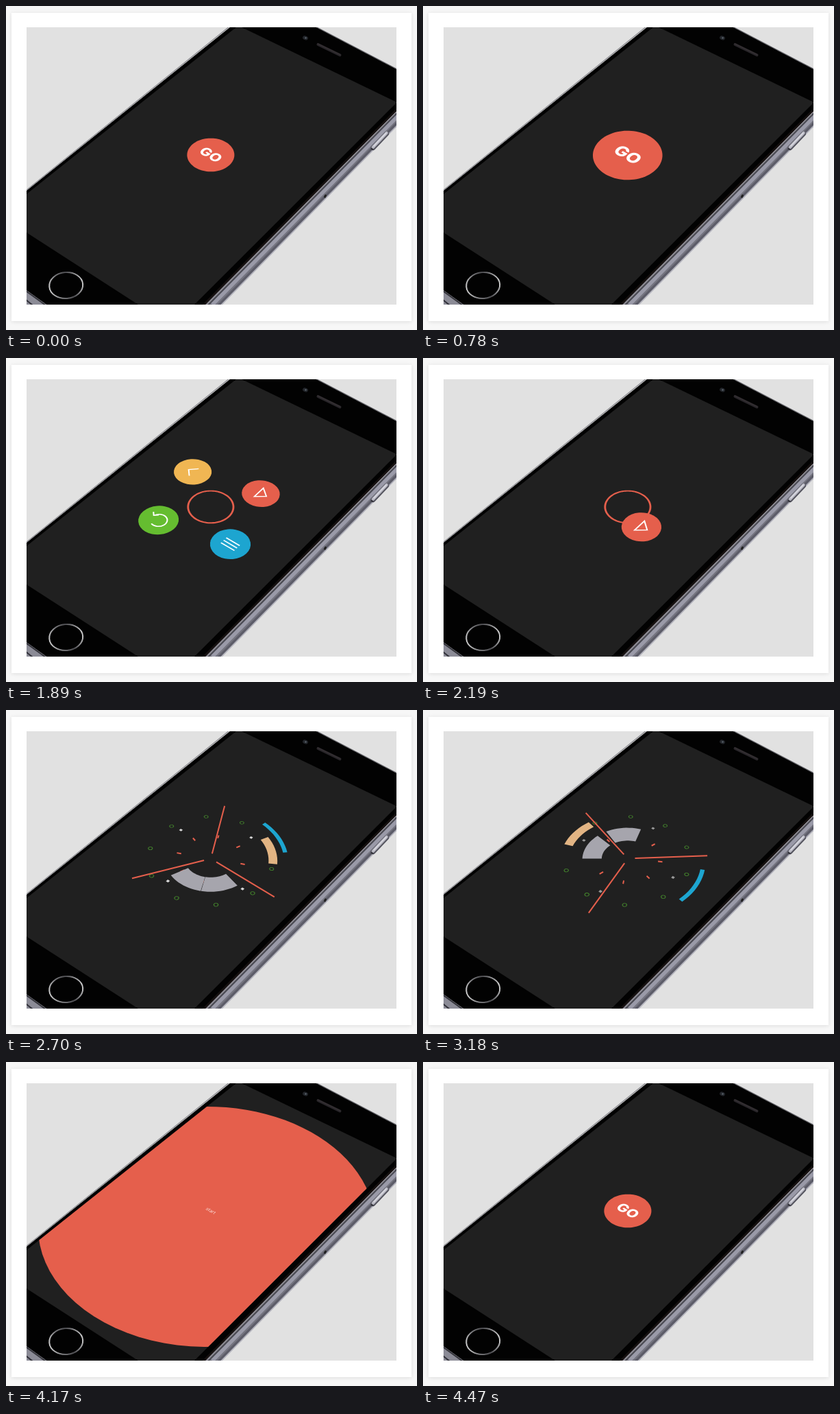
An HTML page with a canvas for the animation above (4.5 s loop, 600 px wide and 472 px high).

```html
<!DOCTYPE html>
<html lang="en">
<head>
<meta charset="utf-8">
<title>Phone menu</title>
<style>
html, body { margin: 0; width: 100%; height: 100%; overflow: hidden; background: #f7f7f7; }
canvas { display: block; width: 600px; height: 472px; }
</style>
</head>
<body>
<canvas id="stage"></canvas>
<script>
const LOOP = 4500, STEP = 30, RAD = Math.PI / 180;
const RED = '#e55f4c', YELLOW = '#f0b653', GREEN = '#65bd30', BLUE = '#1da5d0';
const GRAY = '#a6a5ad', TAN = '#e2b483';
const TILT = 38.7 * RAD, BTN = 34.5, ORBIT = 79.5, ITEM = 28.6;

const canvas = document.getElementById('stage');
const ctx = canvas.getContext('2d');
const dpr = window.devicePixelRatio || 1;
canvas.width = 600 * dpr;
canvas.height = 472 * dpr;

const clamp = p => Math.max(0, Math.min(1, p));
const span = (t, a, b) => clamp((t - a) / (b - a));
const mix = (a, b, p) => a + (b - a) * p;
const easeOut = p => 1 - (1 - p) ** 3;
const easeInOut = p => p < .5 ? 4 * p ** 3 : 1 - 4 * (1 - p) ** 3;
const backOut = p => 1 + 2.2 * (p - 1) ** 3 + 1.2 * (p - 1) ** 2;

// Phone plane to stage, with perspective
function project(x, y) {
  const w = 1 - .00055 * y + .0001 * x;
  return [299 + x / w, 216.5 + .705 * y / w];
}
const polar = (r, deg) => project(r * Math.cos(deg * RAD), r * Math.sin(deg * RAD));

function home() { ctx.setTransform(dpr, 0, 0, dpr, 0, 0); }

// Draw in the phone's own axes around a point of the plane
function place(x, y, scale, draw) {
  if (scale <= .001) return;
  const p = project(x, y), a = project(x + 1, y), b = project(x, y + 1);
  ctx.save();
  ctx.transform(a[0] - p[0], a[1] - p[1], b[0] - p[0], b[1] - p[1], p[0], p[1]);
  ctx.rotate(TILT);
  ctx.scale(scale, scale);
  draw();
  ctx.restore();
}

function trace(points, close) {
  points.forEach((p, i) => i ? ctx.lineTo(p[0], p[1]) : ctx.moveTo(p[0], p[1]));
  if (close) ctx.closePath();
}
function poly(points, fill) {
  ctx.beginPath();
  trace(points, true);
  ctx.fillStyle = fill;
  ctx.fill();
}
function line(points, color, width) {
  ctx.beginPath();
  trace(points);
  ctx.strokeStyle = color;
  ctx.lineWidth = width;
  ctx.stroke();
}
function arcPoints(r, from, to) {
  const n = Math.max(8, Math.ceil(Math.abs(to - from) / 4));
  return Array.from({ length: n + 1 }, (_, i) => polar(r, mix(from, to, i / n)));
}
function band(r0, r1, mid, width, color) {
  const a = mid - width / 2, b = mid + width / 2;
  poly([...arcPoints(r1, a, b), ...arcPoints(r0, b, a)], color);
}
function disc(r, hole = 0) {
  ctx.beginPath();
  trace(arcPoints(r, 0, 360), true);
  if (hole > 0) trace(arcPoints(hole, 360, 0), true);
  ctx.fillStyle = RED;
  ctx.fill();
}
function label(text, size, weight) {
  ctx.font = `${weight} ${size}px Inter, "Open Sans", sans-serif`;
  ctx.textAlign = 'center';
  ctx.textBaseline = 'alphabetic';
  ctx.fillStyle = '#fff';
  ctx.fillText(text, 0, size * .36);
}

function backdrop() {
  ctx.fillStyle = '#f7f7f7';
  ctx.fillRect(0, 0, 600, 472);
  ctx.save();
  ctx.shadowColor = 'rgba(0,0,0,.11)';
  ctx.shadowBlur = 6 * dpr;
  ctx.shadowOffsetY = dpr;
  ctx.fillStyle = '#fff';
  ctx.fillRect(8, 10, 584, 449);
  ctx.restore();
  ctx.fillStyle = '#e1e1e1';
  ctx.fillRect(30, 31, 540, 404);
}

function screenPath() {
  ctx.beginPath();
  trace([[336, 31], [344, 31], [570, 140], [570, 141], [275, 435], [193, 435], [30, 330], [30, 274]], true);
}

function phone() {
  // metal side
  poly([[570, 146], [570, 175], [314, 435], [284, 435]], '#74747f');
  line([[574, 158], [301, 435]], '#9a9aa8', 6);
  line([[574, 153], [294, 437]], '#4a4a52', 2);
  line([[574, 167], [309, 437]], '#5c5c68', 3);
  line([[574, 171], [313, 437]], '#b3b3bd', 1.5);

  // glass
  poly([[327, 31], [453, 31], [570, 92], [570, 150], [289, 435], [59, 435], [30, 415], [30, 269]], '#020202');
  line([[574, 147], [287, 437]], '#15100f', 3);
  line([[574, 150], [290, 438]], '#a9a5a8', 1);
  line([[326, 30], [29, 269]], '#8e8e93', 1.4);
  line([[329, 31], [30, 271]], '#000', 2);
  line([[452, 30], [571, 92]], '#55555c', 1);
  poly([[30, 414], [59, 435], [30, 435]], '#8b8b96');
  line([[29, 415], [58, 436]], '#34343a', 2);
  line([[29, 428], [39, 436]], '#32323a', 2);

  screenPath();
  ctx.fillStyle = '#202020';
  ctx.fill();

  // earpiece and camera
  ctx.lineCap = 'round';
  line([[455.5, 56], [487.5, 71.5]], '#29262a', 4);
  line([[455, 55], [488, 71]], '#3a3436', 1);
  ctx.beginPath();
  ctx.ellipse(437, 46.5, 4, 3, .3, 0, 7);
  ctx.fillStyle = '#22252a';
  ctx.fill();
  ctx.beginPath();
  ctx.arc(437.5, 46.5, 1.3, 0, 7);
  ctx.fillStyle = '#59616a';
  ctx.fill();

  // side button and notch
  line([[536, 206.5], [555.5, 186]], '#55555f', 7);
  line([[536, 205.5], [555.5, 185]], '#b8b8c2', 4.5);
  line([[537, 204], [555, 185]], '#dedee5', 1.4);
  line([[533.5, 208], [535.5, 209]], '#33333a', 2);
  line([[465.5, 278], [466.5, 276]], '#222', 3);
  ctx.lineCap = 'butt';

  const ring = ctx.createLinearGradient(63, 415, 113, 398);
  [[0, '#d2d2d2'], [.3, '#77777a'], [.6, '#4c4c50'], [.85, '#9a9a9c'], [1, '#e0e0e0']]
    .forEach(s => ring.addColorStop(...s));
  ctx.beginPath();
  ctx.ellipse(87.7, 407, 24.5, 19, -.08, 0, 7);
  ctx.strokeStyle = ring;
  ctx.lineWidth = 2;
  ctx.stroke();
}

const icons = {
  play() { trace([[-4, -12], [-4, 11], [10, -.5]], true); },
  menu() { [-6, 0, 6].forEach(v => trace([[-12, v], [12, v]])); },
  undo() {
    ctx.arc(.5, 0, 12, -165 * RAD, 109 * RAD);
    trace([[-16.5, -8], [-11.5, -3], [-6.5, -8]]);
  },
  back() { trace([[2.5, -11], [-8, 0], [1.5, 10]]); }
};
const items = [
  { color: BLUE, icon: 'menu', at: 0 },
  { color: GREEN, icon: 'undo', at: 90 },
  { color: YELLOW, icon: 'back', at: 180 },
  { color: RED, icon: 'play', at: -90 }
];

function drawItem(item, r, deg, scale) {
  const a = deg * RAD + TILT;
  place(r * Math.cos(a), r * Math.sin(a), scale, () => {
    ctx.beginPath();
    ctx.arc(0, 0, ITEM, 0, 7);
    ctx.fillStyle = item.color;
    ctx.fill();
    ctx.beginPath();
    icons[item.icon]();
    ctx.strokeStyle = '#fff';
    ctx.lineWidth = 2;
    ctx.stroke();
  });
}

function button(t) {
  if (t >= 2400) return;
  const grow = mix(1, 1.51, easeOut(span(t, 0, 270)) * (1 - easeInOut(span(t, 700, 1000))));
  const gone = 1 - span(t, 2220, 2400);
  const hole = 31.7 * easeInOut(span(t, 840, 1170));
  ctx.globalAlpha = gone;
  disc(BTN * grow, hole * grow);
  ctx.globalAlpha = 1;
  place(0, 0, grow * (1 - easeInOut(span(t, 700, 930))), () => label('GO', 23, 800));
}

function menu(t) {
  if (t < 1140 || t > 2400) return;
  const out = easeInOut(span(t, 1140, 1380));
  const q = span(t, 1780, 2310);
  const r = ORBIT * out * (1 - clamp((q - .35) / .65) ** 2);
  for (const item of items) {
    const main = item.icon === 'play';
    let scale = out;
    if (main) {
      const tap = easeOut(span(t, 1470, 1620)) * (1 - easeInOut(span(t, 1650, 1830)));
      scale *= (1 + .78 * tap) * (1 - span(t, 2280, 2400));
    } else {
      scale *= 1 - easeInOut(span(q, .38, .72));
    }
    drawItem(item, r, item.at + 150 * q, scale);
  }
}

function radar(t) {
  if (t < 2340 || t >= 3420) return;
  const s = easeOut(span(t, 2310, 2490)) * (1 - easeInOut(span(t, 3310, 3420)));
  if (s <= 0) return;
  // turn between the two reference poses, 480 ms apart
  const k = (t - 2700) / 480;
  const each = (n, base, fn) => { for (let i = 0; i < n; i++) fn(base + i * 360 / n); };

  each(10, 13.5 + 43.3 * k, a => {
    place(91 * s * Math.cos(a * RAD), 91 * s * Math.sin(a * RAD), s, () => {
      ctx.beginPath();
      ctx.arc(0, 0, 3, 0, 7);
      ctx.strokeStyle = '#417f2b';
      ctx.lineWidth = 1.2;
      ctx.stroke();
    });
  });
  each(8, 13.5 + 39 * k, a => line([polar(44.5 * s, a), polar(51 * s, a)], RED, 2));
  each(3, 40.5 + 76.5 * k, a => line([polar(10.5 * s, a), polar(118 * s, a)], RED, 2));
  band(38 * s, 66 * s, 78.5 + 125 * k, 47, GRAY);
  band(38 * s, 66 * s, 126 + 138 * k, 47, GRAY);
  band(85 * s, 98 * s, -10.7 - 134 * k, 35, TAN);
  band(108 * s, 114.5 * s, -25 + 55 * k, 36.5, BLUE);
  ctx.globalAlpha = clamp(.88 - .3 * k);
  each(4, 53.5 - 23 * k, a => {
    place(75.5 * s * Math.cos(a * RAD), 75.5 * s * Math.sin(a * RAD), s, () => {
      ctx.fillStyle = '#f2f2f2';
      ctx.fillRect(-2, -2, 4, 4);
    });
  });
  ctx.globalAlpha = 1;
}

function flood(t) {
  if (t < 3420) return;
  const leave = easeInOut(span(t, 3990, 4410));
  const r = t < 4020 ? Math.min(360, 266 * ((t - 3420) / 180) ** 1.4) : mix(340, BTN, leave);
  if (r > 0) disc(r);
  const grow = t < 3600 ? .11 * span(t, 3540, 3600) : mix(.11, 1, backOut(span(t, 3600, 3930)));
  place(0, 0, grow * (1 - span(t, 3990, 4200)), () => label('start', 56, 300));
  place(0, 0, easeOut(span(t, 4230, 4440)), () => label('GO', 23, 800));
}

function frame(now) {
  const t = Math.floor((now % LOOP) / STEP) * STEP;
  home();
  backdrop();
  ctx.save();
  ctx.beginPath();
  ctx.rect(30, 31, 540, 404);
  ctx.clip();
  phone();
  screenPath();
  ctx.clip();
  button(t);
  menu(t);
  radar(t);
  flood(t);
  ctx.restore();
}

let start = null;
function tick(now) {
  if (start === null) start = now;
  frame(now - start);
  requestAnimationFrame(tick);
}
frame(0);
requestAnimationFrame(tick);
</script>
</body>
</html>
```
